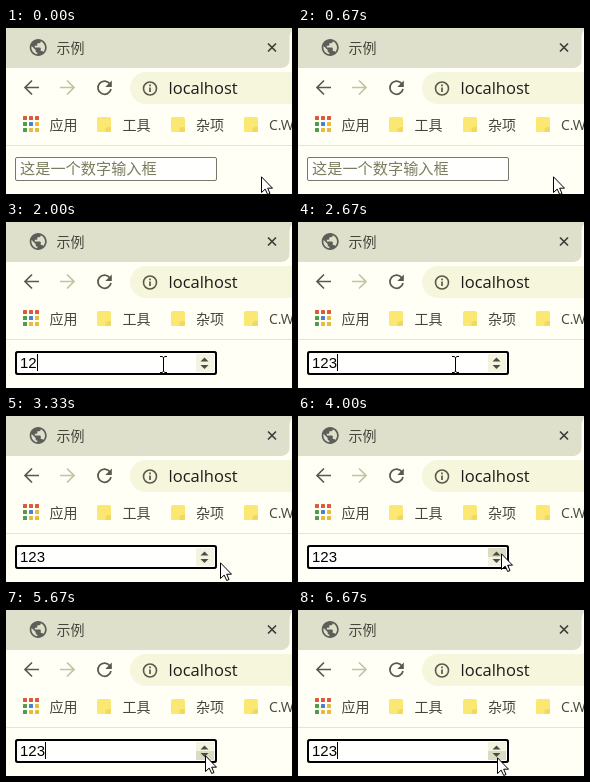
Animation, 286 px wide and 166 px high, one loop 7.33 s. Source, as an HTML page:

```html
<!DOCTYPE html>
<html lang="zh-CN">
<head>
<meta charset="utf-8">
<title>示例</title>
<style>
  html, body { margin: 0; width: 100%; height: 100%; overflow: hidden; background: #fffff5; }
  svg { display: block; width: 286px; height: 166px; }
  text { font-family: "Noto Sans CJK SC", "Noto Sans CJK", "Noto Sans", sans-serif; font-size: 14px; fill: #45463c; }
  .url { font-family: "Open Sans", "Noto Sans", sans-serif; font-size: 16.5px; fill: #1c1c1a; }
  .latin { font-family: "Open Sans", "Noto Sans", sans-serif; }
  .hint { font-size: 15.2px; fill: #7c7c5e; }
  .value { font-family: "Liberation Sans", Arial, sans-serif; font-size: 15px; fill: #000; }
  .line { fill: none; stroke: #5a5a4c; stroke-width: 1.7; }
</style>
</head>
<body>
<svg viewBox="0 0 286 166">
  <defs>
    <g id="folder">
      <path d="M0 1.5Q0 0 1.5 0H12.5Q14 0 14 1.5V13.5Q14 15 12.5 15H1.5Q0 15 0 13.5Z" fill="#fae873"/>
      <path d="M8.5 15V11.5L11 10H14V13.5Q14 15 12.5 15Z" fill="#f2d860"/>
    </g>
  </defs>

  <!-- tab strip -->
  <path d="M0 0H286V2Q283.5 5 283.5 9V31Q283.5 39 276 40H0Z" fill="#dfe0cb"/>
  <path transform="translate(22 9.3) scale(.85)" fill="#5c5e58" d="M12 2C6.48 2 2 6.48 2 12s4.48 10 10 10 10-4.48 10-10S17.52 2 12 2zm-1 17.93c-3.95-.49-7-3.85-7-7.93 0-.62.08-1.21.21-1.79L9 15v1c0 1.1.9 2 2 2v1.930zm6.9-2.54c-.26-.81-1-1.39-1.9-1.39h-1v-3c0-.55-.45-1-1-1H8v-2h2c.55 0 1-.45 1-1V7h2c1.1 0 2-.9 2-2v-.41c2.93 1.190 5 4.060 5 7.410 0 2.080-.8 3.970-2.100 5.390z"/>
  <text x="50.5" y="25">示例</text>
  <path class="line" d="M262 15.5L270 23.5M270 15.5L262 23.5" style="stroke:#3c3c38"/>

  <!-- toolbar -->
  <path class="line" d="M33 59.5H19.5M26 52.5L19 59.5L26 66.5"/>
  <path class="line" d="M54 59.5H67.5M61 52.5L68 59.5L61 66.5" style="stroke:#c2c2a4"/>
  <path class="line" d="M104 56A6.6 6.6 0 1 0 105 61"/>
  <path d="M105.8 52.5V59H99.3Z" fill="#5a5a4c"/>
  <path d="M286 44H140A16 16 0 0 0 140 76H286Z" fill="#f5f6dc"/>
  <circle class="line" cx="144" cy="60.5" r="6.5" style="stroke-width:1.6"/>
  <path class="line" d="M144 59.5V64M144 56.5V58.2"/>
  <text class="url" x="162.5" y="66">localhost</text>

  <!-- bookmarks -->
  <g id="apps"></g>
  <text x="43.5" y="102">应用</text>
  <use href="#folder" x="91" y="89"/>
  <text x="116.5" y="102">工具</text>
  <use href="#folder" x="165" y="89"/>
  <text x="190" y="102">杂项</text>
  <use href="#folder" x="238" y="89"/>
  <text class="latin" x="263" y="102">C.W</text>
  <path d="M0 117.5H286" stroke="#e2e3ea"/>

  <!-- number field -->
  <rect id="box" x="9.5" y="129.5" width="201" height="23" rx="1.5" fill="#fffffd" stroke="#77776c"/>
  <rect id="focus" x="10" y="130" width="200" height="22" rx="2" fill="none" stroke="#000" stroke-width="2"/>
  <text id="hint" class="hint" x="14" y="146">这是一个数字输入框</text>
  <text id="value" class="value" x="14" y="146"></text>
  <rect id="caret" y="132" width="1" height="17"/>
  <g id="spin">
    <rect x="190" y="132" width="18" height="18" fill="#f3f3e0"/>
    <rect id="half" x="190" width="18" height="9" fill="#dcdcc2"/>
    <path d="M194.5 139.5L198.5 135.5L202.5 139.5ZM194.5 143L198.5 147L202.5 143Z" fill="#4c4c46"/>
  </g>

  <path id="beam" d="M-3 .5H-1L.5 1.5L2 .5H4M.5 1.5V15.5M-3 16.5H-1L.5 15.5L2 16.5H4" fill="none" stroke="#000"/>
  <path id="arrow" d="M.5 .8V16.5L4.2 13.1L6.7 18.5L9 17.5L6.7 12.2H11.5Z" fill="#fff" stroke="#000"/>
</svg>
<script>
const LOOP = 7330;
const $ = id => document.getElementById(id);

// Each step changes only the listed parts of the state.
const steps = [
  { at: 0, ptr: 'arrow', x: 255, y: 148, focus: 0, spin: 0, caret: 0, value: '', hover: '' },
  { at: 1000, ptr: 'beam', x: 154, y: 133, spin: 1 },
  { at: 1330, focus: 1, caret: 1 },
  { at: 1670, x: 157, y: 134, value: '1' },
  { at: 2000, value: '12' },
  { at: 2330, value: '123' },
  { at: 3000, ptr: 'arrow', x: 215, y: 147, caret: 0 },
  { at: 3330, x: 214, y: 146 },
  { at: 3670, x: 205, y: 137, caret: 1, hover: 'up' },
  { at: 4000, x: 203, caret: 0 },
  { at: 4330, x: 198 },
  { at: 4670, caret: 1 },
  { at: 5000, x: 199, y: 145, caret: 0, hover: 'down' },
  { at: 5670, caret: 1 },
  { at: 6330, y: 147, caret: 0 },
  { at: 6670, caret: 1 }
];

const show = (id, on) => { $(id).style.display = on ? '' : 'none'; };

function render(s) {
  for (const id of ['arrow', 'beam']) show(id, s.ptr === id);
  $(s.ptr).setAttribute('transform', `translate(${s.x} ${s.y})`);
  show('focus', s.focus);
  show('spin', s.spin);
  show('half', s.hover);
  $('half').setAttribute('y', s.hover === 'up' ? 132 : 141);
  show('hint', !s.value);
  $('value').textContent = s.value;
  show('caret', s.caret);
  $('caret').setAttribute('x', 14 + Math.round(s.value.length * 8.34));
}

const [red, green, blue, gold] = ['#e0583c', '#4f9c4c', '#4a80d0', '#eabb3a'];
const hues = [red, red, red, green, blue, gold, green, gold, gold];
$('apps').innerHTML = hues.map((c, i) =>
  `<rect x="${17 + i % 3 * 6}" y="${88 + Math.floor(i / 3) * 6}" width="4" height="4" rx=".5" fill="${c}"/>`).join('');

const start = performance.now();
let last = -1;
function tick() {
  const t = (performance.now() - start) % LOOP;
  const past = steps.filter(s => s.at <= t);
  if (past.length !== last) {
    last = past.length;
    render(Object.assign({}, ...past));
  }
  requestAnimationFrame(tick);
}
tick();
</script>
</body>
</html>
```
